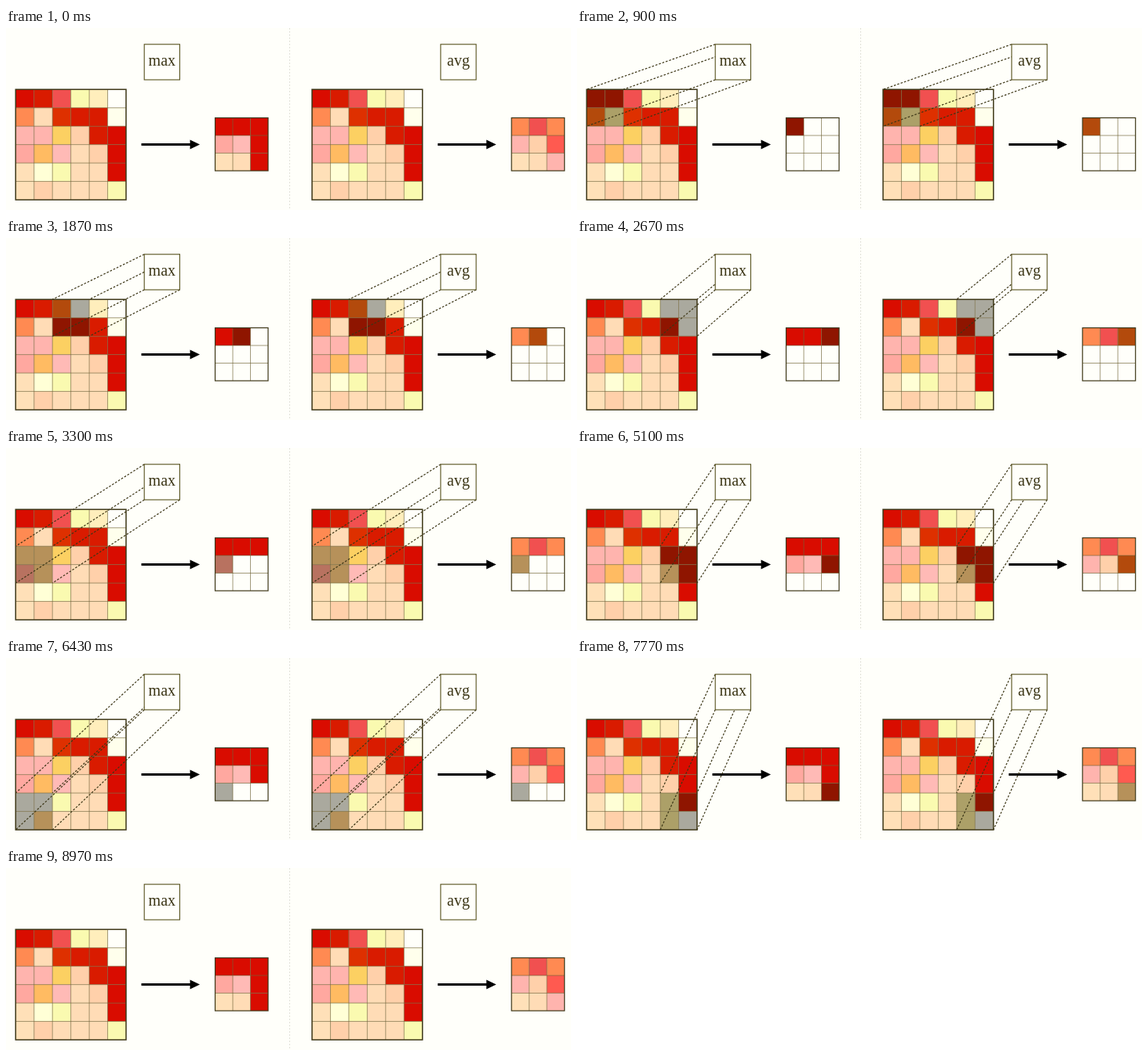
Recreate the animation shown at these times as an HTML page with a canvas. Size 720 by 232 pixels, loop 9.27 s.

```html
<!DOCTYPE html>
<html lang="en">
<head>
<meta charset="utf-8">
<title>Max and average pooling</title>
<style>
html, body { margin: 0; width: 720px; height: 232px; overflow: hidden; background: #fffffa; }
canvas { display: block; }
</style>
</head>
<body>
<canvas id="stage"></canvas>
<script>
const W = 720, H = 232, LOOP = 9270;
const STEPS = [670, 1530, 2430, 3300, 4200, 5100, 5930, 6870, 7770, 8670];
const PAPER = '#fffffa', INK = '#3c3616', OLIVE = '#56501c';
const PANEL_SHIFT = 377.7;

const canvas = document.getElementById('stage');
const ctx = canvas.getContext('2d');
const ratio = window.devicePixelRatio || 1;
canvas.width = W * ratio;
canvas.height = H * ratio;
canvas.style.width = W + 'px';
canvas.style.height = H + 'px';

const MAROON = '#8f1500', RUST = '#b34a0c', TAN = '#b6915a';
const CLAY = '#b87260', DRAB = '#aca068', GRAY = '#aaa99e';

// each tone as [plain, inside the pooling window]
const TONES = {
  r: ['#d90c00', MAROON], d: ['#d91b00', MAROON], v: ['#de3000', MAROON],
  c: ['#f15050', RUST], o: ['#ff8a52', RUST], k: ['#ff5a50', RUST],
  p: ['#ffb4ae', TAN], l: ['#ffbab6', TAN], s: ['#ffd0aa', TAN], a: ['#ffbb62', TAN],
  g: ['#fcd062', TAN], q: ['#ffa8a0', CLAY], e: ['#ffdcb6', DRAB],
  f: ['#ffe0b8', GRAY], y: ['#fafab0', GRAY], b: ['#ffeebc', GRAY],
  i: ['#ffffd6', GRAY], n: ['#ffffec', GRAY], w: [PAPER, GRAY]
};
const INPUT = ['rdcybw', 'oevddn', 'ppgsdr', 'qalesr', 'fiyeer', 'fseeey'];
const PANELS = [
  { label: 'max', output: ['rrr', 'qlr', 'fer'] },
  { label: 'avg', output: ['oco', 'psk', 'fep'] }
];
const IN = { x: 12.3, y: 78.3, cell: 23.45, n: 6 };
const OUT = { x: 266.5, y: 114.5, cell: 22.5, n: 3 };
const BOX = { x: 176.2, y: 20.8, size: 45.2 };

function line(x1, y1, x2, y2) {
  ctx.beginPath();
  ctx.moveTo(x1, y1);
  ctx.lineTo(x2, y2);
  ctx.stroke();
}

function fillCells(grid, rows, count, isShaded) {
  for (let i = 0; i < count; i++) {
    const col = i % grid.n, row = Math.floor(i / grid.n);
    ctx.fillStyle = TONES[rows[row][col]][isShaded(col, row) ? 1 : 0];
    ctx.fillRect(grid.x + col * grid.cell, grid.y + row * grid.cell, grid.cell, grid.cell);
  }
}

function rule(grid, border) {
  const size = grid.cell * grid.n;
  ctx.lineWidth = 1;
  ctx.strokeStyle = 'rgba(112,100,56,0.65)';
  for (let i = 1; i < grid.n; i++) {
    const d = i * grid.cell;
    line(grid.x + d, grid.y, grid.x + d, grid.y + size);
    line(grid.x, grid.y + d, grid.x + size, grid.y + d);
  }
  ctx.lineWidth = border;
  ctx.strokeStyle = INK;
  ctx.strokeRect(grid.x, grid.y, size, size);
}

function arrow() {
  ctx.strokeStyle = ctx.fillStyle = '#000';
  ctx.lineWidth = 3.2;
  line(172.5, 148.5, 236, 148.5);
  ctx.beginPath();
  ctx.moveTo(247, 148.5);
  ctx.lineTo(234.5, 142.5);
  ctx.lineTo(234.5, 154.5);
  ctx.fill();
}

function projection(col, row) {
  ctx.strokeStyle = INK;
  ctx.lineWidth = 1.2;
  ctx.setLineDash([2.6, 2]);
  for (const [u, v] of [[0, 0], [1, 0], [0, 1], [1, 1]]) {
    line(BOX.x + u * BOX.size, BOX.y + v * BOX.size,
      IN.x + (col + 2 * u) * IN.cell, IN.y + (row + 2 * v) * IN.cell);
  }
  ctx.setLineDash([]);
}

function operator(label) {
  ctx.fillStyle = PAPER;
  ctx.fillRect(BOX.x, BOX.y, BOX.size, BOX.size);
  ctx.strokeStyle = OLIVE;
  ctx.lineWidth = 1.1;
  ctx.strokeRect(BOX.x, BOX.y, BOX.size, BOX.size);
  ctx.fillStyle = INK;
  ctx.font = '20px "Liberation Serif", serif';
  ctx.textAlign = 'center';
  ctx.fillText(label, BOX.x + BOX.size / 2, 48);
}

// step 0..8 selects a pooling window; -1 shows the finished result
function panel({ label, output }, step) {
  const active = step >= 0;
  const col = step % 3, row = Math.floor(step / 3);
  const isCurrent = (x, y) => active && x === col && y === row;
  fillCells(IN, INPUT, 36, (x, y) => isCurrent(x >> 1, y >> 1));
  fillCells(OUT, output, active ? step + 1 : 9, isCurrent);
  rule(IN, 1.5);
  rule(OUT, 1.2);
  arrow();
  if (active) projection(col * 2, row * 2);
  operator(label);
}

function divider() {
  ctx.strokeStyle = '#e2e1d8';
  ctx.lineWidth = 1;
  ctx.setLineDash([2, 2]);
  line(361.5, 0, 361.5, H);
  ctx.setLineDash([]);
}

function draw(now) {
  const t = now % LOOP;
  const reached = STEPS.filter(start => t >= start).length;
  const step = reached === STEPS.length ? -1 : reached - 1;
  ctx.setTransform(ratio, 0, 0, ratio, 0, 0);
  ctx.fillStyle = PAPER;
  ctx.fillRect(0, 0, W, H);
  divider();
  PANELS.forEach((p, i) => {
    ctx.save();
    ctx.translate(i * PANEL_SHIFT, 0);
    panel(p, step);
    ctx.restore();
  });
}

const begin = performance.now();
function tick() {
  draw(performance.now() - begin);
  requestAnimationFrame(tick);
}
tick();
</script>
</body>
</html>
```
